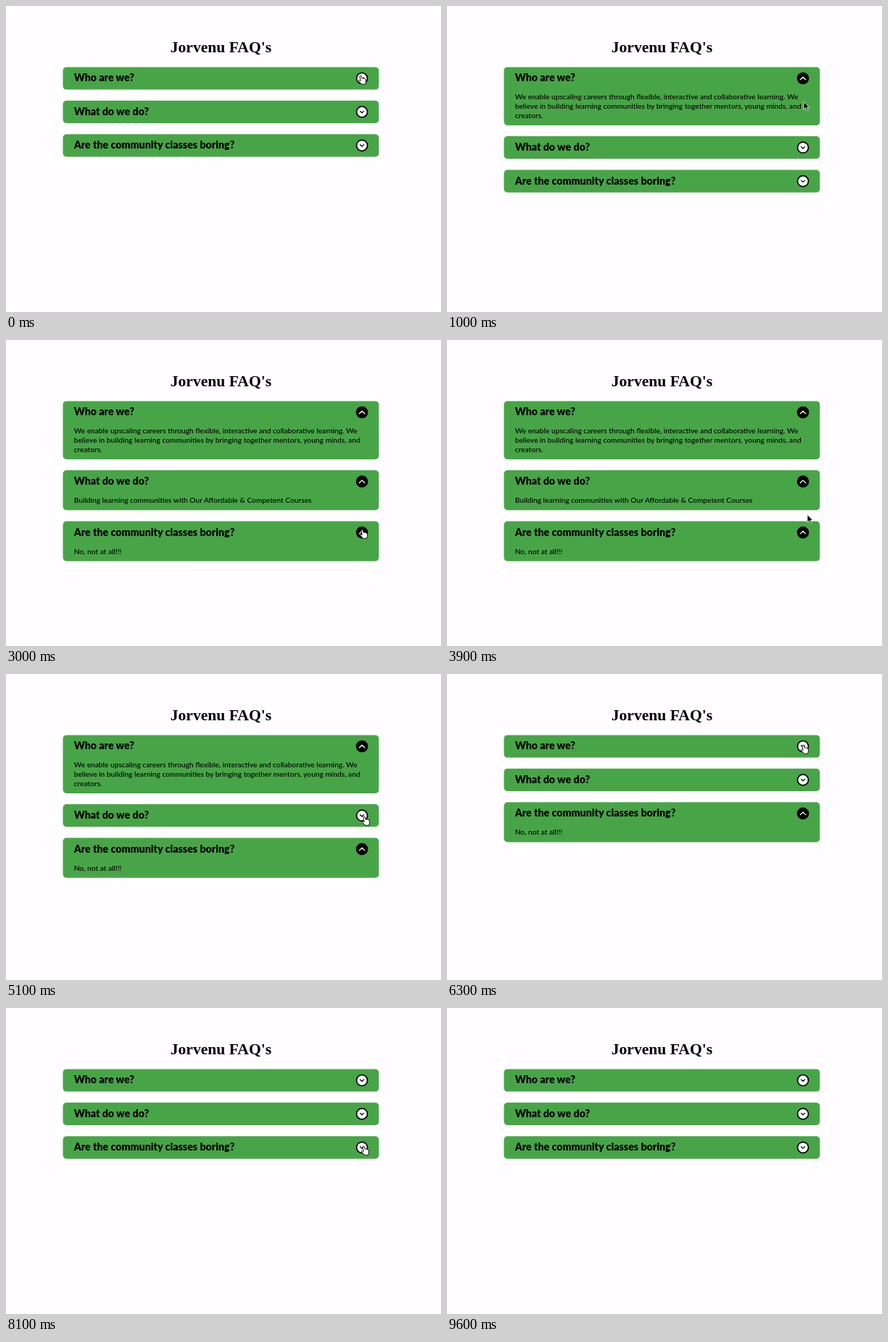
An HTML page for the animation above (9700 ms loop, 600x423 px).

```html
<!DOCTYPE html>
<html lang="en">
<head>
<meta charset="utf-8">
<title>FAQ</title>
<style>
  html, body { margin: 0; height: 100%; overflow: hidden; background: #fffdff; }
  svg { display: block; width: 600px; height: 423px; }
  .title { font: bold 21.6px "Liberation Serif", serif; text-anchor: middle; }
  .question { font: 900 14.2px Lato, sans-serif; }
  .answer { font: 500 10.2px Lato, sans-serif; }
  .bar { fill: #48a547; }
  .disc { stroke: #000; stroke-width: 1.7; fill: #fff; }
  .chevron { fill: none; stroke: #000; stroke-width: 1.3; stroke-linecap: round; stroke-linejoin: round; }
  .open .disc { fill: #000; }
  .open .chevron { stroke: #fff; }
  .item:not(.open) .answer { display: none; }
  .hand { fill: #fff; stroke: #000; stroke-width: .9; stroke-linejoin: round; }
  .arrow { fill: #000; stroke: #fff; stroke-width: .8; }
</style>
</head>
<body>
<svg viewBox="0 0 600 423">
  <text class="title" x="296.4" y="64.3">Jorvenu FAQ's</text>
  <g id="list"></g>
  <g id="cursor">
    <path class="arrow" d="M0 0V10.6L2.5 8.3L4.2 12L6 11.2L4.4 7.6H7.6Z"/>
    <path class="hand" d="M-1.2 .8Q0-.8 1.2 .8L2.2 4.2Q3.4 3.3 4.1 4.3Q5.3 3.6 6 4.8Q7.3 4.7 7.4 6.4Q7.8 9 6.6 12.2H1.2Q-.4 9.6-2.6 7.8Q-3 6.3-1.3 6.6L.2 7.4Z"/>
  </g>
</svg>
<script>
const LOOP = 9700, STEP = 100;
const LEFT = 78.5, TOP = 84.4, CLOSED = 31.2, GAP = 15.2;
const ICON_X = 491, ICON_Y = 15.6;

// Each item is open from its first time to its second.
const items = [
  { question: "Who are we?", from: 400, to: 6200, height: 80.5, answer: [
    "We enable upscaling careers through flexible, interactive and collaborative learning. We",
    "believe in building learning communities by bringing together mentors, young minds, and",
    "creators."] },
  { question: "What do we do?", from: 2100, to: 4800, height: 55.2, answer: [
    "Building learning communities with Our Affordable & Competent Courses"] },
  { question: "Are the community classes boring?", from: 2800, to: 7800, height: 55.2, answer: [
    "No, not at all!!!"] }
];

// Pointer stops: time, x, y
const stops = [
  [0, 489, 96], [500, 489, 97], [1000, 492, 132.5], [1900, 495, 190], [2200, 495, 190],
  [2700, 491, 262], [3100, 491, 262], [3900, 497, 241.5], [4600, 494, 197], [5100, 494, 197],
  [6000, 491, 98], [6300, 491, 98], [7000, 525, 149], [7100, 525, 149], [7600, 493, 191],
  [8100, 493, 191], [8500, 528, 118], [8600, 531, 58], [8700, 530, 23], [8900, 531, -20]
];

const list = document.getElementById("list");
const cursor = document.getElementById("cursor");
const [arrow, hand] = cursor.children;

function add(parent, tag, attrs, text = "") {
  const el = document.createElementNS("http://www.w3.org/2000/svg", tag);
  for (const key in attrs) el.setAttribute(key, attrs[key]);
  el.textContent = text;
  return parent.appendChild(el);
}

for (const item of items) {
  item.el = add(list, "g", {});
  item.bar = add(item.el, "rect", { class: "bar", x: LEFT, width: 435.8, rx: 5 });
  add(item.el, "text", { class: "question", x: 93.7, y: 20.1 }, item.question);
  item.answer.forEach((line, i) =>
    add(item.el, "text", { class: "answer", x: 93.7, y: 45 + i * 12.9 }, line));
  add(item.el, "circle", { class: "disc", cx: ICON_X, cy: ICON_Y, r: 7.5 });
  item.chevron = add(item.el, "path", { class: "chevron" });
}

function pointerAt(t) {
  const next = stops.findIndex(stop => stop[0] > t);
  if (next < 0) return stops.at(-1).slice(1);
  const [t0, x0, y0] = stops[next - 1], [t1, x1, y1] = stops[next];
  const u = (t - t0) / (t1 - t0), k = u * u * (3 - 2 * u);
  return [x0 + (x1 - x0) * k, y0 + (y1 - y0) * k];
}

function draw(t) {
  const [x, y] = pointerAt(t);
  let top = TOP, onIcon = false;
  for (const item of items) {
    const open = t >= item.from && t < item.to;
    const height = open ? item.height : CLOSED;
    item.el.setAttribute("class", open ? "item open" : "item");
    item.el.setAttribute("transform", `translate(0 ${top})`);
    item.bar.setAttribute("height", height);
    item.chevron.setAttribute("d", open
      ? `M${ICON_X - 3.7} ${ICON_Y + 1.8}l3.7-3.6l3.7 3.6`
      : `M${ICON_X - 2.4} ${ICON_Y - 1}l2.4 2.3l2.4-2.3`);
    onIcon ||= Math.hypot(x - ICON_X, y - top - ICON_Y) < 8.5;
    top += height + GAP;
  }
  cursor.setAttribute("transform", `translate(${x} ${y})`);
  hand.style.display = onIcon ? "" : "none";
  arrow.style.display = onIcon ? "none" : "";
}

function tick() {
  draw(Math.floor(performance.now() % LOOP / STEP) * STEP);
  requestAnimationFrame(tick);
}
tick();
</script>
</body>
</html>
```
